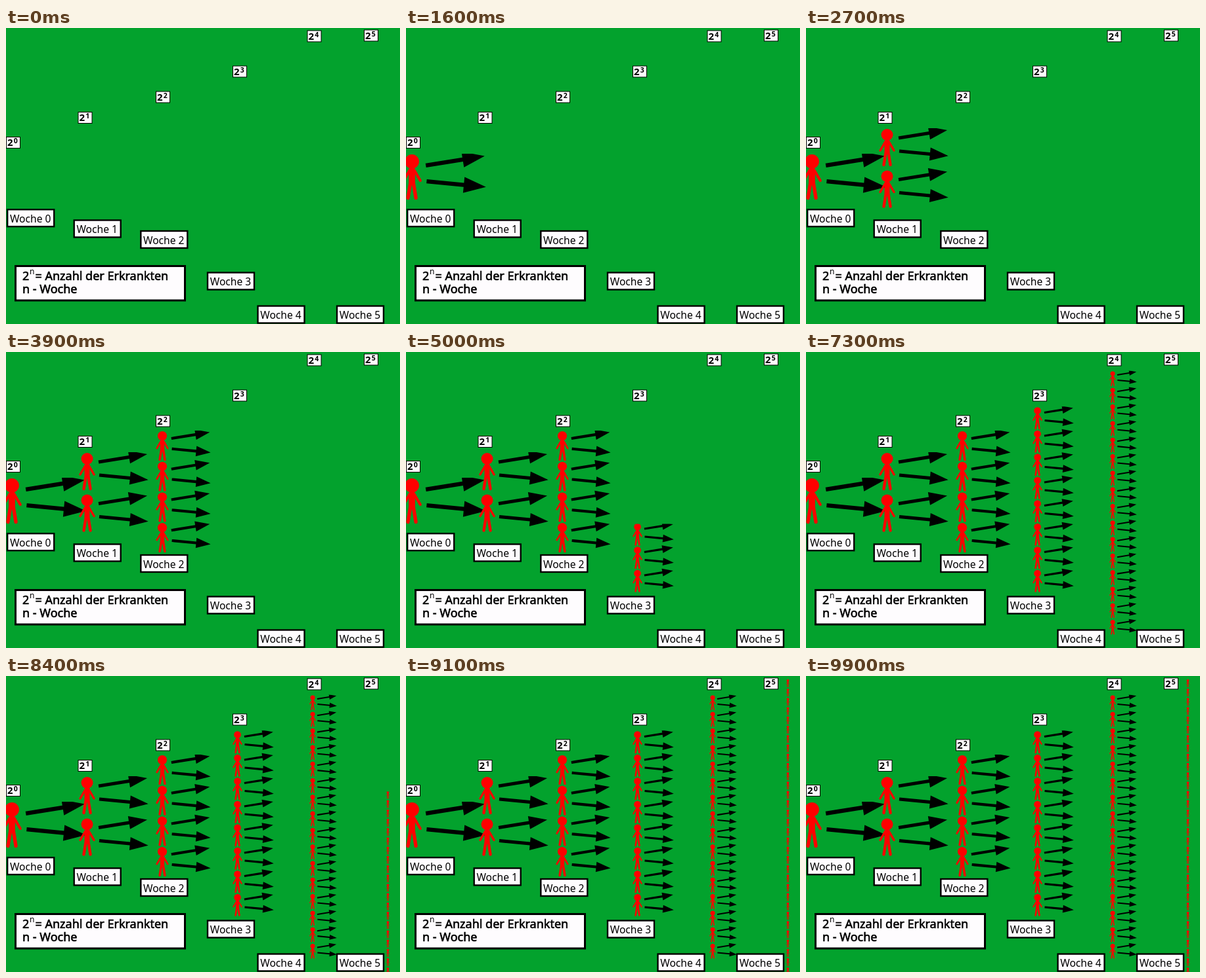
Recreate the animation shown at these times as an HTML page. Size 600 by 452 pixels, loop 10000 ms.

```html
<!DOCTYPE html>
<html lang="de">
<head>
<meta charset="utf-8">
<style>
  html, body { margin: 0; width: 100%; height: 100%; overflow: hidden; background: #03a22d; }
  svg { display: block; width: 600px; height: 452px; font-family: "Noto Sans", "Open Sans", sans-serif; }
  .box { fill: #fefcfe; stroke: #000; }
  .tag { font-weight: 700; }
  .key { font-size: 18px; stroke: #000; stroke-width: .6px; }
</style>
</head>
<body>
<svg id="stage" viewBox="0 0 600 452">
  <defs>
    <g id="person" fill="none" stroke="#fe0000" stroke-linecap="round">
      <circle cy="9" r="9" fill="#fe0000" stroke="none"/>
      <path d="M0 20V34" stroke-width="8"/>
      <path d="M-3 20L-10.5 33M3 20L10.5 33" stroke-width="3.4"/>
      <path d="M-1.7 35L-5 55M1.7 35L5 55" stroke-width="4.4"/>
    </g>
    <path id="arrow" d="M0 -2.6H47V-10L75 0L47 10V2.6H0Z"/>
    <g id="spreader">
      <use href="#person"/>
      <use href="#arrow" transform="translate(17.5 14) rotate(-9.2)"/>
      <use href="#arrow" transform="translate(18.5 34) rotate(5.5)"/>
    </g>
  </defs>
</svg>
<script>
const stage = document.getElementById("stage");
const LOOP = 10000, STEP = 100, WIPE = 500, UNIT = 57;

// top, gap between people, height, wipe start, label x/y, tag x/y
const weeks = [
  [193, 0, 69, 100, 2.2, 277.2, 0, 166],
  [154, 63.5, 57, 1700, 103.7, 293.5, 109.5, 128],
  [121, 46.7, 45, 2950, 205.3, 310, 228, 96.5],
  [84.3, 35.5, 33.8, 4815, 307, 373.5, 345, 57.5],
  [29.5, 25.3, 22.5, 6450, 383.5, 424.5, 458.5, 3.5],
  [5, 14.2, 12, 8090, 504, 424.5, 545, 2.5]
];

function add(parent, name, attrs, text) {
  const el = document.createElementNS("http://www.w3.org/2000/svg", name);
  for (const key in attrs) el.setAttribute(key, attrs[key]);
  if (text) el.textContent = text;
  parent.append(el);
  return el;
}

function box(x, y, width, height, line) {
  add(stage, "rect", { x, y, width, height, "stroke-width": line, class: "box" });
}

function label(x, y, size, text, cls = "") {
  add(stage, "text", { x, y, "font-size": size, class: cls }, text);
}

const wipes = weeks.map(([top, gap, height, start], n) => {
  const clip = add(stage, "clipPath", { id: "clip" + n });
  const rect = add(clip, "rect", { x: -10, width: 620, height: 500 });
  const group = add(stage, "g", { "clip-path": `url(#clip${n})` });
  const count = 2 ** n;
  for (let i = 0; i < count; i++) {
    add(group, "use", {
      href: n < 5 ? "#spreader" : "#person",
      transform: `translate(${9 + 114.5 * n} ${top + gap * i}) scale(${height / UNIT})`
    });
  }
  return { rect, start, top: top - 1, bottom: top + gap * (count - 1) + height + 1 };
});

weeks.forEach(([, , , , x, y, tx, ty], n) => {
  box(x, y, 71, 26, 2.4);
  label(x + 3.7, y + 19.6, 15.6, "Woche " + n);
  box(tx + .5, ty + .5, 21, 17, 1);
  label(tx + 2, ty + 14, 15, "2", "tag");
  label(tx + 11.8, ty + 10, 10.5, String(n), "tag");
});

box(14.5, 363.5, 258, 52.5, 3);
label(25, 385, 18, "2", "key");
label(36, 376, 12, "n");
label(44.5, 385, 18, "= Anzahl der Erkrankten", "key");
label(25, 405, 18, "n - Woche", "key");

function draw(now) {
  const t = Math.floor(now % LOOP / STEP) * STEP;
  for (const { rect, start, top, bottom } of wipes) {
    const shown = Math.min(1, Math.max(0, (t - start) / WIPE));
    rect.setAttribute("y", bottom - shown * (bottom - top));
    rect.setAttribute("height", shown * (bottom - top));
  }
}

let begin;
function tick(now) {
  begin ??= now;
  draw(now - begin);
  requestAnimationFrame(tick);
}
draw(0);
requestAnimationFrame(tick);
</script>
</body>
</html>
```
